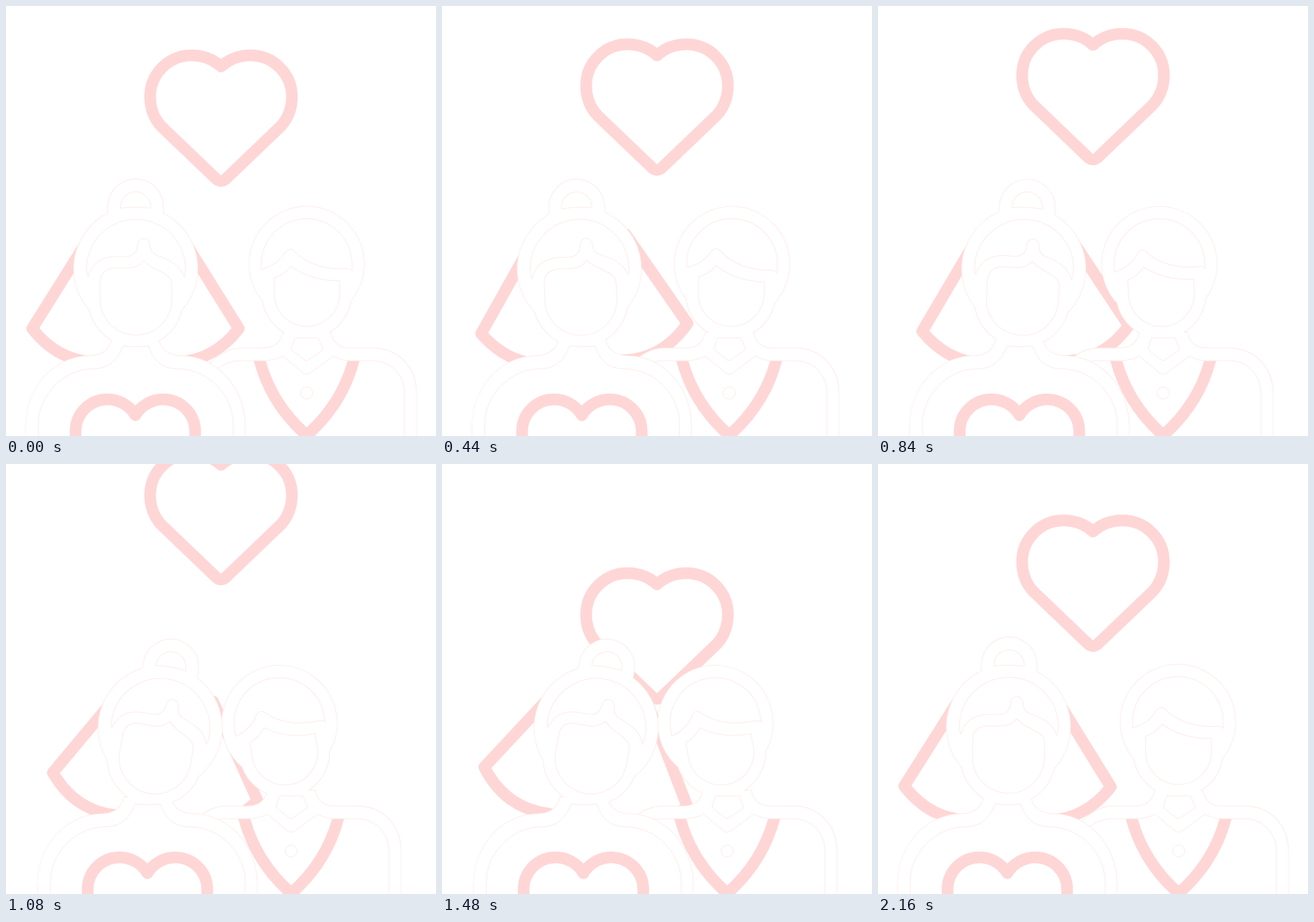
Write an HTML page that moves like this. It is 640 px wide and 640 px high and loops after 2.23 s.

```html
<!DOCTYPE html>
<html lang="en">
<head>
<meta charset="utf-8">
<title>Wedding couple</title>
<style>
  html, body { margin: 0; width: 100%; height: 100%; overflow: hidden; background: #fff; }
  svg { display: block; width: 100%; height: 100%; }
  .pink { fill: none; stroke: #ffd6d6; stroke-width: 17.3; stroke-linejoin: round; }
  .line { fill: none; stroke: #fdebe8; stroke-width: 1; }
  .rim { fill: #fff; stroke: #fdebe8; stroke-width: 1.8; }
  .cover { fill: #fff; }
</style>
</head>
<body>
<svg viewBox="0 0 640 640">
  <defs>
    <clipPath id="vest"><rect x="340" y="528" width="220" height="120"/></clipPath>
    <path id="manBody" d="M280 660 V580 C285 540 320 510 350 509.5 H385 Q408 508 412 486 H483 Q488 509.5 512 509.5 H546 C585 509.5 610.5 540 610.5 575 V660Z"/>
    <path id="brideBody" d="M29.5 660 V625 C29.5 570 70 521 125 521 Q152 520 158 496 H227 Q233 520 260 521 C315 521 355.5 570 355.5 625 V660Z"/>
    <g id="manSkull">
      <circle cx="447.5" cy="384" r="85.5"/>
      <circle cx="447.5" cy="428" r="66.5"/>
    </g>
    <g id="brideSkull">
      <path d="M152 312 V299 A41 41 0 0 1 234 299 V312Z"/>
      <circle cx="193" cy="391" r="92"/>
      <circle cx="193" cy="436.5" r="70.5"/>
    </g>
  </defs>

  <path class="heart pink" d="M320 90 A65 65 0 0 0 276 73.5 A61.5 61.5 0 0 0 214.5 135 C214.5 153 221 168 231 179 L313 257.5 Q320 263.5 327 257.5 L409 179 C419 168 425.5 153 425.5 135 A61.5 61.5 0 0 0 364 73.5 A65 65 0 0 0 320 90Z"/>

  <path class="veil pink" style="fill:#fff" d="M125 343 L39 480 C60 507 90 528 130 530 H256 C296 528 326 507 346.5 480 L261 343Z"/>

  <g class="man">
    <use href="#manBody" class="rim"/>
    <use href="#manSkull" class="rim manHead"/>
    <use href="#manBody" class="cover"/>
    <path class="pink" clip-path="url(#vest)" d="M374 512 Q388.500 587 447.500 639 Q506.500 587 521 512"/>
    <path class="line" d="M285 580 Q310 528 348 528 H385 Q402 527 412 521 L442 546 Q447.5 550 453 546 L487 521 Q497 527 510 528 H546 C575 528 593 552 593 575 V660"/>
    <circle class="line" cx="447.5" cy="576" r="9"/>
    <g class="manHead">
      <use href="#manSkull" class="cover"/>
      <path class="line" d="M380 392 V384 A67.5 67.5 0 0 1 515 384 V394 Q512 390 503 391 C475 392 448 384 430 366 Q423 358 416 366 Q404 386 380 392Z"/>
      <path class="line" d="M399 405 Q414 400 424 387 C445 403 470 409 497 409 V428 A49 49 0 0 1 399 428Z"/>
    </g>
    <path class="line" d="M430 494 L425 509 Q425 512 428 514 L445 527 Q448 529 451 526 L470 513 Q473 511 471 508 L465 494Z"/>
  </g>

  <g class="bride">
    <use href="#brideBody" class="rim"/>
    <use href="#brideSkull" class="rim brideHead"/>
    <use href="#brideBody" class="cover"/>
    <path class="pink" d="M103.5 660 V633 A47.5 47.5 0 0 1 151 585.5 A48.4 48.4 0 0 1 192.5 609 A48.4 48.4 0 0 1 234 585.5 A47.5 47.5 0 0 1 281.5 633 V660"/>
    <g class="brideHead">
      <use href="#brideSkull" class="cover"/>
      <path class="line" d="M170.5 301 V299 A22.5 22.5 0 0 1 215.5 299 V301 Q193 297.5 170.5 301Z"/>
      <path class="line" d="M122 403 Q120 397 120 391 A73.5 73.5 0 0 1 267 391 Q267 400 265 403 C258 383 240 377 227 372 Q214 368 214 355 A9 9 0 0 0 196 355 Q195 372 180 373 H160 C138 375 128 385 122 403Z"/>
      <path class="line" d="M140 436.5 V410 Q141 392 160 390 H182 Q196 390 205 379 C218 393 232 393 243 404 Q247 408 247 415 V436.5 A53.5 53.5 0 0 1 140 436.5Z"/>
    </g>
    <path class="line" d="M48 660 V622 C48 580 85 540 130 540 Q162 540 174 506 Q193 508.5 212 506 Q223 540 255 540 C302 540 338 580 338 622 V660"/>
  </g>
</svg>
<script>
const LOOP = 2230, STEP = 40, LAST = 2160;

const sine = p => (1 - Math.cos(Math.PI * p)) / 2;
const cubic = p => p < 0.5 ? 4 * p ** 3 : 1 - 4 * (1 - p) ** 3;
const ramp = (t, a, b, ease) => ease(Math.min(1, Math.max(0, (t - a) / (b - a))));

// Eased value from a list of [time, value] poses
function pose(t, keys) {
  let v = keys[0][1];
  for (let i = 1; i < keys.length; i++) {
    const [a, from] = keys[i - 1], [b, to] = keys[i];
    if (t >= a) v = from + (to - from) * ramp(t, a, b, sine);
  }
  return v;
}

const HEAD = [[0, 0], [200, 0], [600, -3.6], [1080, 10], [1800, 10], [2230, 0]];
const VEIL = [[0, 0], [240, 0.7], [620, -5.8], [1300, 12], [1600, 10.3], [1780, 10.3], [2200, 0]];
const VEIL_X = [[0, 0], [240, -3], [600, 9.5], [1080, 9], [1300, 0]];

// Slow drift, a fast exit at the top, then a return from behind the couple
const burst = d => 53 * (Math.max(0, d) / 320) ** 3;
const heartY = t => t < 1285
  ? -0.0375 * t - burst(t - 770)
  : 24 - 0.0375 * (t - 1800) + burst(1800 - t);

function put(name, transform) {
  for (const el of document.getElementsByClassName(name)) el.setAttribute("transform", transform);
}

function draw(t) {
  const near = ramp(t, 100, 600, cubic) - ramp(t, 1690, 2060, sine);
  const tilt = pose(t, HEAD);
  put("heart", `translate(0 ${heartY(t)})`);
  put("bride", `translate(${18 * near} 0)`);
  put("man", `translate(${-23 * near} 0)`);
  put("brideHead", `rotate(${tilt} 193 497)`);
  put("manHead", `rotate(${-tilt} 447.5 485)`);
  put("veil", `translate(${18 * near + pose(t, VEIL_X)} 0) rotate(${pose(t, VEIL)} 193 497)`);
}

const start = performance.now();
function tick() {
  const t = (performance.now() - start) % LOOP;
  draw(Math.min(LAST, Math.floor(t / STEP) * STEP));
  requestAnimationFrame(tick);
}
tick();
</script>
</body>
</html>
```
